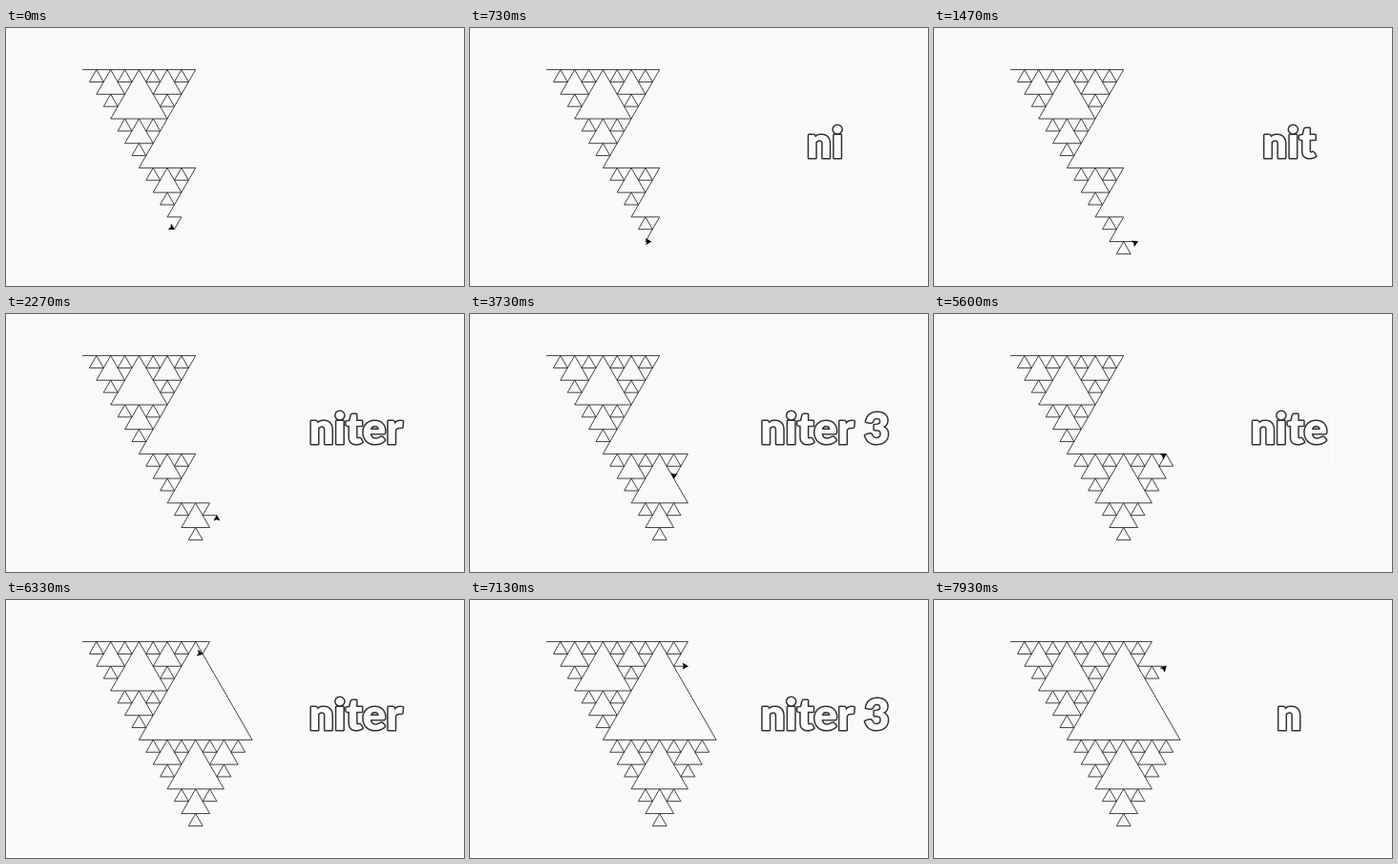
An HTML page with a canvas that plays this animation: 480 by 270 pixels, repeating every 8 s.

```html
<!DOCTYPE html>
<html lang="en">
<head>
<meta charset="utf-8">
<title>Sierpinski turtle</title>
<style>
  html, body { margin: 0; width: 100%; height: 100%; overflow: hidden; background: #f9f9f9; }
  canvas { display: block; }
</style>
</head>
<body>
<canvas id="stage" width="480" height="270"></canvas>
<script>
const ctx = document.getElementById('stage').getContext('2d');
const LOOP = 8000, FPS = 15;
const UNIT = 14.84, START = { x: 80, y: 43.6 }, ARROW = 0.594;
const MOVE_SHARE = 0.21; // part of each stroke spent moving; the rest is turning

// Strokes of the curve F -> F - G + F + G - F: go a length, then turn.
const strokes = [];
function grow(depth) {
  if (depth === 0) {
    strokes.push({ length: 1, turn: 0 });
    return;
  }
  const side = 2 ** (depth - 1);
  const turn = angle => { strokes[strokes.length - 1].turn = angle; };
  const go = () => strokes.push({ length: side, turn: 0 });
  grow(depth - 1); turn(-120);
  go(); turn(120);
  grow(depth - 1); turn(120);
  go(); turn(-120);
  grow(depth - 1);
}
grow(4);

// [time in ms, strokes done]
const pace = [[0, 73.80], [1467, 82.37], [2267, 86.80], [3733, 95.37],
  [5600, 105.80], [6333, 109.92], [7933, 118.51]];

function strokesDone(time) {
  let i = 1;
  while (i < pace.length - 1 && time > pace[i][0]) i++;
  const [t0, s0] = pace[i - 1], [t1, s1] = pace[i];
  return s0 + (s1 - s0) * (time - t0) / (t1 - t0);
}

function drawTurtle(done) {
  let { x, y } = START, heading = 0;
  ctx.strokeStyle = '#222';
  ctx.lineWidth = 0.85;
  ctx.beginPath();
  ctx.moveTo(x, y);
  for (let i = 0; i < done; i++) {
    const { length, turn } = strokes[i];
    const part = Math.min(1, done - i);
    const moved = Math.min(1, part / MOVE_SHARE);
    const turned = Math.max(0, (part - MOVE_SHARE) / (1 - MOVE_SHARE));
    const angle = heading * Math.PI / 180;
    x += Math.cos(angle) * length * moved * UNIT;
    y -= Math.sin(angle) * length * moved * UNIT;
    ctx.lineTo(x, y);
    heading += turn * turned;
  }
  ctx.stroke();

  ctx.save();
  ctx.translate(x, y);
  ctx.rotate(-heading * Math.PI / 180);
  ctx.scale(ARROW, ARROW);
  ctx.beginPath();
  ctx.moveTo(0, 0);
  ctx.lineTo(-9, -5);
  ctx.lineTo(-7, 0);
  ctx.lineTo(-9, 5);
  ctx.closePath();
  ctx.fillStyle = ctx.strokeStyle = '#000';
  ctx.lineWidth = 1;
  ctx.fill();
  ctx.stroke();
  ctx.restore();
}

const LABEL = 'niter 3';
const TYPING = { start: 285, key: 395, clear: 3460, cycle: 3820 };

function drawLabel(time) {
  const { start, key, clear, cycle } = TYPING;
  const phase = (time - start + cycle) % cycle;
  if (phase >= clear) return;
  const count = Math.min(LABEL.length, 1 + Math.floor(phase / key));
  const text = LABEL.slice(0, count);
  ctx.font = '900 46px Lato, sans-serif';
  const width = ctx.measureText(text).width;
  const left = 372 - width / 2, baseline = 135.7;
  ctx.lineJoin = 'round';
  ctx.lineWidth = 3;
  ctx.strokeStyle = '#333';
  ctx.strokeText(text, left, baseline);
  ctx.fillStyle = '#fbfbfb';
  ctx.fillText(text, left, baseline);

  const sinceKey = phase - (count - 1) * key;
  if (sinceKey > key / 2) {
    ctx.fillStyle = '#fff';
    ctx.fillRect(left + width + 4, 105, 1, 52);
  }
}

function draw() {
  const now = performance.now() % LOOP;
  const time = Math.floor((now + 4) * FPS / 1000) * 1000 / FPS % LOOP;
  ctx.fillStyle = '#f9f9f9';
  ctx.fillRect(0, 0, 480, 270);
  drawTurtle(strokesDone(time));
  drawLabel(time);
  requestAnimationFrame(draw);
}
draw();
</script>
</body>
</html>
```
